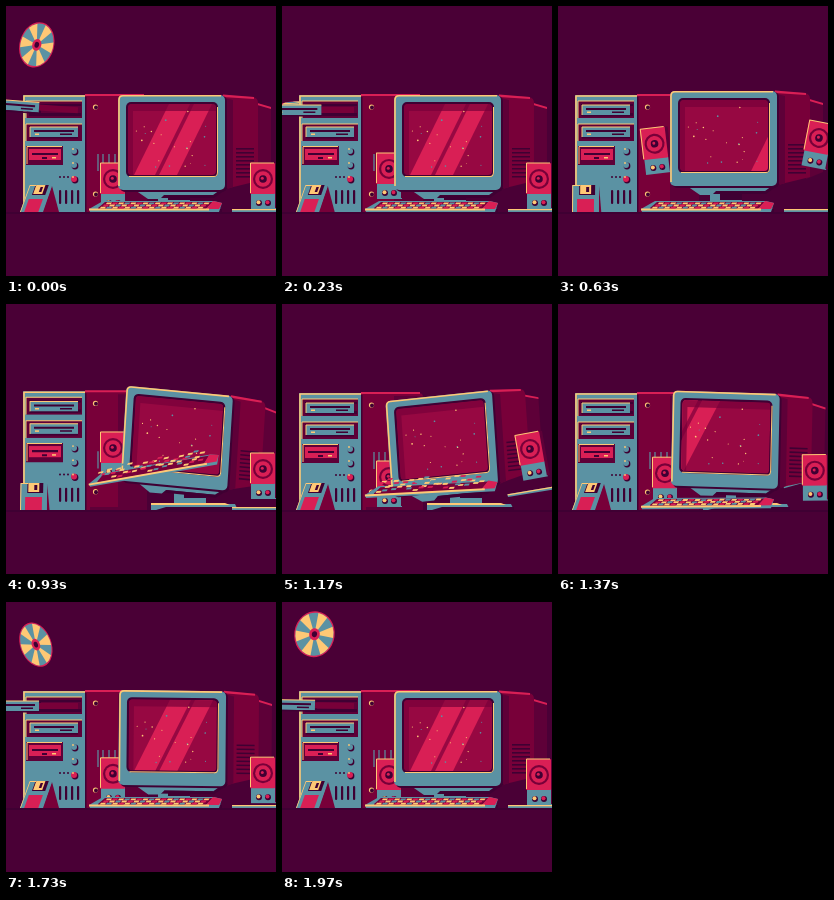
Recreate the animation shown at these times as an HTML page. Size 270 px wide and 270 px high, loop 2010 ms.

```html
<!DOCTYPE html>
<html lang="en">
<head>
<meta charset="utf-8">
<title>Dancing computer</title>
<style>
html, body { margin: 0; width: 100%; height: 100%; overflow: hidden; background: #4a0036; }
svg { display: block; width: 100%; height: 100%; }
.teal { fill: #5b92a3; } .gold { fill: #ffc875; } .red { fill: #d91f55; }
.wine { fill: #780039; } .plum { fill: #5e0038; } .dark { fill: #3f0033; }
.line { fill: none; stroke: #ffc875; stroke-width: 1.6; stroke-linejoin: round; }
.thin { stroke-width: 1; }
</style>
</head>
<body>
<svg viewBox="0 0 270 270">
  <defs>
    <clipPath id="glass"><rect x="122" y="98" width="88" height="71" rx="4"/></clipPath>
    <g id="bay">
      <rect class="plum" width="56" height="17"/>
      <path class="line thin" d="M0 17V0H56"/>
    </g>
    <g id="drive">
      <rect class="teal" width="48" height="10"/>
      <path class="line thin" d="M0 10V0H48"/>
      <path class="dark" d="M4 3H44V5H4zM30 6.5H42V8H30zM0 10H48V11.5H0z"/>
      <path class="gold" d="M5 6.5h4v1.5h-4z"/>
    </g>
    <g id="speaker">
      <path class="teal" d="M-12 14H13V30H-12z"/>
      <path class="plum" d="M9 -16H15V29H12V15z"/>
      <rect class="red" x="-13" y="-16" width="25" height="31" rx="1"/>
      <path class="line thin" d="M-12.5 14V-16H11"/>
      <circle class="wine" r="10"/><circle class="red" r="7.8"/>
      <circle class="dark" r="3.8"/><circle class="red" cx="-.7" cy="-.7" r="1.5"/>
      <circle class="dark" cx="-4" cy="24" r="3"/><circle class="gold" cx="-4.5" cy="23.3" r="2"/>
      <circle class="dark" cx="5" cy="24" r="3"/><circle class="red" cx="4.5" cy="23.3" r="2"/>
    </g>
  </defs>
  <rect width="270" height="270" fill="#4a0036"/>
  <path class="dark" d="M0 206H270V208H0z"/>
  <g id="disc">
    <circle class="red" r="23"/><circle class="teal" r="21.6"/>
    <g id="wedges"></g>
    <circle class="red" r="6"/><circle class="dark" r="3"/>
  </g>
  <g id="tower">
    <path class="wine" d="M79 89H137Q141 89 141 93V206H79z"/>
    <path class="plum" d="M112 92H141V206H84V203H112z"/>
    <path class="red" d="M79 88H138V90H79z"/>
    <path class="teal" d="M17 89H79V206H17z"/>
    <path class="line" d="M18 206V90H79"/>
    <path class="dark" d="M79 91h1.5V206H79z"/>
    <g id="screws"></g>
    <path stroke="#5b92a3" stroke-width="1.2" d="M92 148v17M97 148v17M103 148v17M109 148v17"/>
    <use href="#bay" x="20" y="95"/><use href="#bay" x="20" y="118"/>
    <path class="dark" d="M23 98H75V110H23z"/>
    <path class="plum" d="M35 100H75V107H35z"/>
    <use href="#drive" x="24" y="121"/>
    <path class="plum" d="M20 140H57V159H20z"/>
    <path class="red" d="M23 143H55V154H23z"/>
    <path class="line thin" d="M21 158V140.5H56"/>
    <path class="dark" d="M26 147H52V149H26zM36 151H41V153H36z"/>
    <path class="gold" d="M46 151h4v1.5h-4z"/>
    <g id="buttons"></g>
    <g id="slots"></g>
    <g id="tray"><rect id="arm" class="wine" x="72" y="101" height="6"/><use href="#drive" x="24" y="99"/></g>
  </g>
  <use href="#speaker" id="left"/>
  <g id="base">
    <path class="teal" d="M168 188H200V200H229L232 206H145V200H168z"/>
    <path class="gold" d="M145 199H219L224 201H145z"/>
    <path class="dark" d="M160 203H232V206H150zM178 188H200V194H178z"/>
  </g>
  <g id="mat">
    <path class="teal" d="M226 203H274V206H226z"/><path class="gold" d="M226 203H274V204.3H226z"/>
  </g>
  <g id="monitor">
    <path class="plum" d="M248 96L265 101V170L248 177z"/>
    <path class="red" d="M248 96L265 101V103L248 98z"/>
    <path class="wine" d="M215 89L247 91Q252 92 252 97V175L215 184z"/>
    <path class="plum" d="M219 92L227 94V181L219 184z"/>
    <path class="red" d="M217 88.5L248 91V93L217 91z"/>
    <g id="vents"></g>
    <path class="dark" d="M134 182H222L208 192H146z"/>
    <path class="teal" d="M129 184H214L207 189H158L154 193H142z"/>
    <path class="dark" d="M158 189H207V191H158z"/>
    <rect class="dark" x="114" y="90" width="107" height="96" rx="5"/>
    <rect class="teal" x="112" y="89" width="107" height="95" rx="5"/>
    <path class="line" d="M113 180V94Q113 89.8 117 89.8H215"/>
    <rect class="dark" x="120" y="96" width="92" height="75" rx="5"/>
    <path class="line thin" d="M123 170.5H208Q211.5 170.5 211.5 166V101"/>
    <g clip-path="url(#glass)">
      <rect fill="#970842" x="122" y="98" width="88" height="71"/>
      <path id="wideGlare" class="red" d="M163 98H184L149 169H128z"/>
      <path id="sideGlare" class="red" d="M188 98H206L171 169H153z"/>
      <path class="wine" opacity=".7" d="M122 98H210V105H127V169H122z"/>
      <g id="stars"></g>
    </g>
  </g>
  <use href="#speaker" id="right"/>
  <g id="keyboard">
    <path class="teal" d="M83 203L97 195H208L216 197L213 206H84z"/>
    <path class="wine" d="M92 202L99 196H207L200 203H92z"/>
    <path class="red" d="M207 195L216 197L213 203L200 203z"/>
    <path class="gold" d="M83 202.6H203V204.5H83z"/>
    <g id="keys"></g>
  </g>
  <path class="wine" id="wedge"/>
  <g id="floppy">
    <path class="teal" d="M0 -27H25L27 -25V0H0z"/>
    <path class="dark" d="M7 -27H23V-17H7z"/><path class="gold" d="M8 -27H19V-18H8z"/>
    <path class="dark" d="M14 -25H17V-20H14z"/>
    <path class="red" d="M5 -13H22V0H5z"/><path class="line thin" d="M.5 0V-26.5H8"/>
  </g>
</svg>
<script>
const LOOP = 2010, KEYS_PER_ROW = 17;
const $ = id => document.getElementById(id);
const repeat = (id, n, make) => $(id).innerHTML = Array.from({ length: n }, (_, i) => make(i)).join('');
const move = (id, value) => $(id).setAttribute('transform', value);

let seed = 117649;
const random = () => (seed = seed * 16807 % 2147483647) / 2147483647;

repeat('wedges', 6, i => `<path class="gold" d="M0 0L-5.6 -20.9Q0 -22.3 5.6 -20.9z" transform="rotate(${i * 60})"/>`);
repeat('screws', 2, i => `<circle class="gold" cx="89.5" cy="${101 + i * 87}" r="2.6"/><circle class="dark" cx="90" cy="${101.4 + i * 87}" r="2"/>`);
repeat('buttons', 3, i => {
  const y = 145 + i * 14;
  return `<circle class="dark" cx="69" cy="${y + 1}" r="3.4"/><circle class="${i < 2 ? 'teal' : 'red'}" cx="68" cy="${y}" r="3"/>
    <circle class="gold" cx="67" cy="${y - 2}" r=".9"/><circle class="dark" cx="${54 + i * 4}" cy="171" r="1"/>`;
});
repeat('slots', 4, i => `<rect class="dark" x="${53 + i * 6}" y="184" width="2.2" height="14" rx="1"/>`);
repeat('vents', 8, i => `<path class="dark" d="M230 ${142 + i * 4}h18v1.6h-18z"/>`);
repeat('stars', 22, i => `<circle class="${i % 3 ? 'gold' : 'teal'}" cx="${126 + random() * 80}" cy="${102 + random() * 63}" r="${.4 + random() * .5}"/>`);
repeat('keys', 3 * KEYS_PER_ROW, i => `<path class="${['gold', 'red', 'gold', 'teal'][i % 4]}" d="M0 0h5l-1.2 1.8h-5z"/>`);
const keys = [...$('keys').children];

// Smooth rise from 0 to 1 between two times.
function ramp(t, from, to) {
  const u = Math.min(1, Math.max(0, (t - from) / (to - from)));
  return u * u * (3 - 2 * u);
}

// Smooth bump of height 1 around a peak, wrapping with the loop.
function hop(t, peak, reach) {
  const gap = Math.abs(t - peak);
  const u = Math.min(gap, LOOP - gap) / reach;
  return u < 1 ? .5 + .5 * Math.cos(Math.PI * u) : 0;
}

function drawMonitor(t) {
  const tilt = -8.5 * hop(t, 430, 200) + 5.5 * hop(t, 930, 220) - 6 * hop(t, 1170, 220) + 6 * hop(t, 1530, 260);
  const bounce = 4 * hop(t, 630, 200);
  move('monitor', `translate(${166 + tilt * .95} ${137 - tilt * .4 - bounce}) rotate(${tilt * .65}) skewY(${tilt * .35}) translate(-166 -137)`);
  const sweep = t < 1000 ? 100 * ramp(t, 300, 850) : -90 * (1 - ramp(t, 1200, 1550));
  move('wideGlare', `translate(${sweep} 0)`);
  move('sideGlare', `translate(${sweep > 0 ? sweep * 4 : sweep} 0)`);
}

function drawSpeakers(t) {
  const sway = hop(t, 530, 300), land = hop(t, 1530, 250);
  const leftY = 173 - 40 * hop(t, 530, 450) - 28 * hop(t, 940, 200) - 13 * land;
  move('left', `translate(${107 - 14 * sway} ${leftY}) rotate(${-9 * sway})`);

  const jump = hop(t, 630, 200), kick = hop(t, 1170, 220);
  const rightY = 173 + 5 * hop(t, 430, 150) - 41 * jump - 8 * hop(t, 930, 150) - 28 * kick - 20 * land;
  move('right', `translate(${257 + 4 * jump - 9 * kick} ${rightY}) rotate(${11 * jump - 10 * kick})`);
  const lift = hop(t, 1340, 380);
  move('mat', `translate(0 ${-22 * lift}) rotate(${-16 * lift} 226 206)`);
}

function drawKeyboard(t) {
  const high = hop(t, 930, 230), mid = hop(t, 1170, 220), low = hop(t, 1530, 200);
  const jump = 8 * high + 9 * mid + 2 * low;
  move('keyboard', `translate(0 ${-23 * high - 12 * mid - 6 * low}) rotate(${-10 * high - 3 * (mid + low)} 83 205)`);
  keys.forEach((key, i) => {
    const row = i / KEYS_PER_ROW | 0, column = i % KEYS_PER_ROW;
    const hopUp = jump * (.55 + .45 * Math.sin(column * 1.1 + row * 2 + t / 90));
    key.setAttribute('transform', `translate(${101 + column * 6.1 - row * 3} ${196.5 + row * 2.1 - hopUp})`);
  });
}

function drawTower(t) {
  move('tower', `translate(0 206) scale(1 ${1 - .06 * hop(t, 430, 180) + .015 * hop(t, 930, 200)}) translate(0 -206)`);
  const open = 39 * (1 - ramp(t, 190, 350) + ramp(t, 1390, 1500));
  const tilt = -15 * hop(t, 1530, 110) + 4 * hop(t, 0, 60);
  move('tray', `rotate(${tilt} 70 103) translate(${-open} 0)`);
  $('arm').setAttribute('width', open);
  return open;
}

// The disc is thrown from the tray, peaks, and falls back in.
function drawDisc(t, open) {
  const time = (t < 1000 ? t + LOOP : t) - 1880;
  const u = time / 310;
  $('disc').style.display = u > -1 && u < 1.55 ? '' : 'none';
  const arc = Math.min(1, u * u);
  const x = 34 - 18 * arc + (t < 1000 ? 39 - open : 0);
  const width = Math.max(.13, 1 - 1.4 * arc);
  move('disc', `translate(${x} ${26 + 72 * arc}) rotate(${Math.sign(u) * 90 * arc}) scale(${width} 1)`);
  move('wedges', `rotate(${time * .2})`);
}

function drawFloppy(t) {
  const lean = 1 - ramp(t, 180, 680) + ramp(t, 900, 1120);
  move('floppy', `matrix(${1 - .17 * lean} 0 ${-.36 * lean} 1 14 206)`);
  $('wedge').setAttribute('d', `M${41 + 5 * lean} 180L${43 + 10 * lean} 206H${41 - 4 * lean}z`);
}

function draw(t) {
  drawMonitor(t);
  drawSpeakers(t);
  drawKeyboard(t);
  drawDisc(t, drawTower(t));
  drawFloppy(t);
  move('base', `translate(${16 * (ramp(t, 630, 900) - ramp(t, 1550, 1720) - 1)} 0)`);
}

const start = performance.now();
function frame() {
  draw((performance.now() - start) % LOOP);
  requestAnimationFrame(frame);
}
draw(0);
requestAnimationFrame(frame);
</script>
</body>
</html>
```
